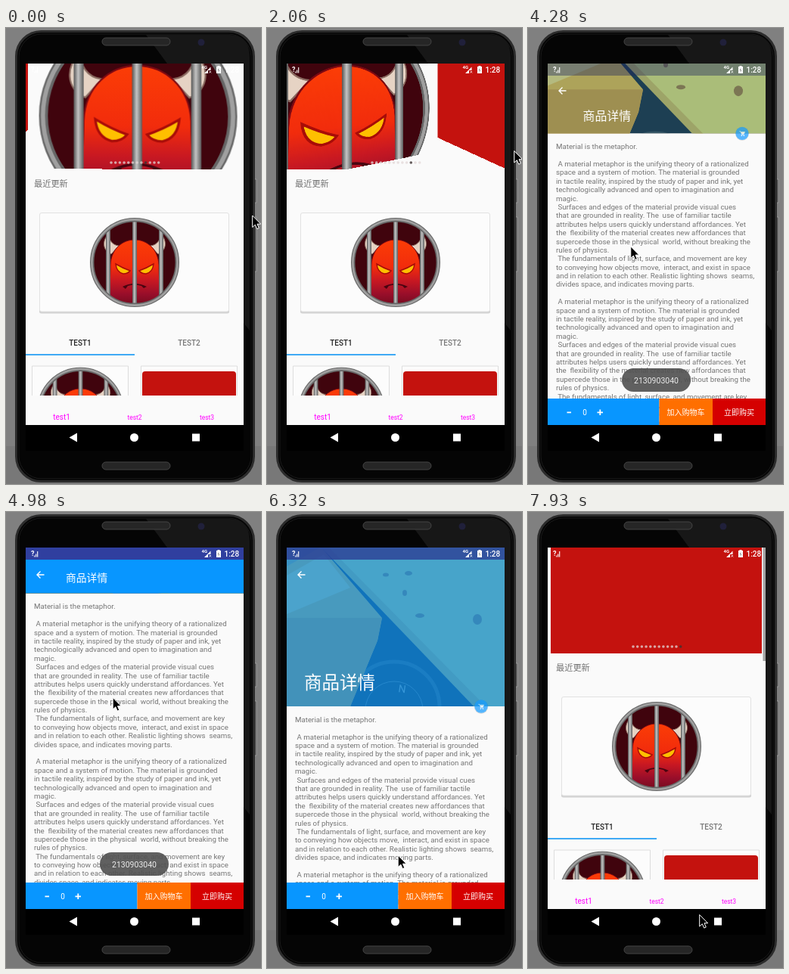
An HTML page for the animation above (7.99 s loop, 337 px wide and 603 px high).

```html
<!DOCTYPE html>
<html lang="zh">
<head>
<meta charset="utf-8">
<title>Shop demo</title>
<style>
html, body { margin: 0; width: 100%; height: 100%; overflow: hidden; background: #808080; }
body > svg { position: absolute; left: 0; top: 0; }
text { font-family: Roboto, "Noto Sans CJK SC", "Noto Sans CJK", sans-serif; white-space: pre; }
.mid { text-anchor: middle; }
#pager { position: absolute; left: 26px; top: 47px; width: 288px; height: 139.5px; overflow: hidden; background: #fafafa; }
.page { position: absolute; left: 0; top: 0; width: 288px; height: 139.5px; overflow: hidden; transform-origin: 50% 0; }
#red::before { content: ""; position: absolute; left: 4px; width: 279px; height: 100%; background: #c4120e; }
</style>
</head>
<body>
<svg width="337" height="603">
  <defs>
    <linearGradient id="steel">
      <stop offset="0" stop-color="#555"/><stop offset=".45" stop-color="#c4c4c4"/><stop offset="1" stop-color="#5a5a5a"/>
    </linearGradient>
    <linearGradient id="skin" x2="0" y2="1">
      <stop offset="0" stop-color="#fb3d06"/><stop offset=".4" stop-color="#f22c0c"/><stop offset=".6" stop-color="#c81822"/><stop offset=".8" stop-color="#980e2a"/><stop offset="1" stop-color="#6a0a1c"/>
    </linearGradient>
    <clipPath id="disc"><circle r="55"/></clipPath>
    <clipPath id="list"><rect x="26" y="440" width="288" height="46"/></clipPath>
    <g id="devil">
      <circle r="56" fill="#40040d"/>
      <g clip-path="url(#disc)">
        <path id="horn" d="M-34-38C-43-30-43-16-31-11L-21-22C-30-23-34-30-34-38Z" fill="#e6d3c4" stroke="#8a6a60"/>
        <use href="#horn" transform="scale(-1 1)"/>
        <path d="M-35 60C-34 40-32 20-32 3C-31-18-16-30 0-30S31-18 32 3C32 20 34 40 35 60Z" fill="url(#skin)" stroke="#7d0812"/>
        <path id="eye" d="M-25 2Q-15 8-6 11Q-9 15-15 15Q-24 13-25 2Z" fill="#ffbf00" stroke="#a80c08" stroke-width="1.5"/>
        <use href="#eye" transform="scale(-1 1)"/>
        <path d="M-16 32Q0 24 16 32L12 34L9 31Q0 28-9 31L-12 35Z" fill="#4a0410"/>
        <path id="bar" d="M-3-58h6v116h-6z" fill="url(#steel)"/>
        <use href="#bar" x="-35"/><use href="#bar" x="35"/>
      </g>
      <circle r="56.3" fill="none" stroke="#666" stroke-width="5.4"/>
      <circle r="56.6" fill="none" stroke="#a0a0a0" stroke-width="2.6"/>
    </g>
  </defs>
  <!-- phone -->
  <path d="M0 553H337V603H0Z" fill="#787878"/>
  <path d="M328 200h3v31h-3zM328 250h3v72h-3z" fill="#555" stroke="#aaa" stroke-width=".7"/>
  <rect x="13.5" y="4.5" width="314" height="595" rx="33" fill="#050505" stroke="#2c2c2c" stroke-width="3"/>
  <rect x="17" y="8" width="307" height="588" rx="30" fill="none" stroke="#1a1a1a"/>
  <path d="M185 9H295Q322 9 322 38V400L314 390V47H213Z" fill="#171717"/>
  <g fill="#262626" stroke="#444"><rect x="127" y="13" width="90" height="10" rx="5"/><rect x="127" y="574" width="90" height="10" rx="5"/></g>
  <circle cx="258" cy="19" r="4.5" fill="#20203a"/>
  <rect x="26" y="525" width="288" height="34"/>
  <!-- home -->
  <rect x="26" y="47" width="288" height="478" fill="#fafafa"/>
  <text x="37" y="210" font-size="11.2" fill="#757575">最近更新</text>
  <rect x="44" y="246.5" width="251" height="131" rx="2.5" fill="#d2d2d2"/>
  <rect x="44.5" y="244.5" width="250" height="130.5" rx="2.5" fill="#fcfcfc" stroke="#e2e2e2"/>
  <use href="#devil" transform="translate(170 310)"/>
  <g class="mid" font-size="10" font-weight="500">
    <text x="98" y="419.5" fill="#222">TEST1</text><text x="242" y="419.5" fill="#777">TEST2</text>
  </g>
  <rect x="26" y="431" width="144" height="2" fill="#3ea9f5"/>
  <g clip-path="url(#list)">
    <path d="M34.5 447H161.5V490H34.5ZM178.5 447H305.5V490H178.5Z" fill="#fcfcfc" stroke="#ddd"/>
    <use href="#devil" transform="translate(98.5 506) scale(.97)"/>
    <rect x="180" y="454" width="124" height="124" rx="4" fill="#c4120e"/>
  </g>
  <g class="mid" fill="#f0f"><text x="73.5" y="518" font-size="10">test1</text>
    <text x="170" y="518" font-size="8.5">test2</text><text x="265.5" y="518" font-size="8.5">test3</text></g>
</svg>

<div id="pager">
  <div class="page" id="red"></div>
  <div class="page" id="mon"><svg width="288" height="140"><use href="#devil" transform="translate(144 69.5) scale(2.22)"/></svg></div>
</div>

<svg width="337" height="603">
  <defs>
    <clipPath id="screen"><rect x="26" y="47" width="288" height="478"/></clipPath>
    <clipPath id="head"><rect id="headBox" x="26" y="47" width="288" height="210"/></clipPath>
    <clipPath id="navBox"><rect x="26" y="525" width="288" height="34"/></clipPath>
  </defs>
  <g id="dots"></g>
  <rect id="scrollbar" x="310.5" y="47" width="3.5" height="150" fill="#8c8c8c" opacity=".8"/>

  <g id="detail"><g clip-path="url(#screen)">
    <rect x="26" y="47" width="288" height="478" fill="#fafafa"/>
    <g id="body" font-size="9.72" fill="#757575"></g>
    <g clip-path="url(#head)">
      <g id="photo">
        <rect x="26" y="47" width="288" height="215" fill="#24241f"/>
        <g fill="none" stroke="#6b6754"><circle cx="168" cy="258" r="60" stroke-width="5" opacity=".5"/><circle cx="168" cy="262" r="38"/></g>
        <text x="174" y="239" font-size="14" fill="#a19a7e" transform="rotate(8 180 232)">N</text>
        <path d="M26 47H72L152 140L146 170L108 262H26Z" fill="#e0a628"/>
        <path d="M26 140L152 140L146 170L108 262H26Z" fill="#cc8c1c"/>
        <path d="M26 84L75 56L110 100L26 135Z" fill="#e8c458"/>
        <path d="M26 47H70L26 72Z" fill="#b08a3c"/>
        <path d="M72 47H314V262H284Z" fill="#dcc850"/>
        <path d="M72 47H82L294 262H278Z" fill="#cba83a"/>
        <g fill="#a06c20"><ellipse cx="157" cy="83" rx="4" ry="2.5"/><ellipse cx="187" cy="81" rx="5" ry="3"/><ellipse cx="182" cy="107" rx="3" ry="4"/><ellipse cx="202" cy="137" rx="6" ry="3"/><ellipse cx="278" cy="142" rx="6" ry="7"/></g>
      </g>
      <rect id="scrim" x="26" y="47" width="288" height="210" fill="#0896ff"/>
    </g>
    <rect x="26" y="47" width="288" height="16" fill="#000" opacity=".22"/>
    <rect id="topBar" x="26" y="47" width="288" height="16" fill="#303f9f"/>
    <path d="M50.5 83H41M45.5 78.5L41 83L45.5 87.5" fill="none" stroke="#fff" stroke-width="1.4"/>
    <text id="title" fill="#fff">商品详情</text>
    <g id="fab">
      <circle cy="1.5" r="20.5" fill="#000" opacity=".16"/><circle r="19.5" fill="#159bff"/>
      <path d="M-8-6h3l4 8h6l3-6h-11" fill="#fff" stroke="#fff" stroke-width="1.5"/>
      <path d="M-1 2l-1.5 2.5h9" fill="none" stroke="#fff" stroke-width="1.3"/>
      <circle cx="-1.5" cy="7" r="1.6" fill="#fff"/><circle cx="5.5" cy="7" r="1.6" fill="#fff"/>
    </g>
    <path d="M26 490H173.5V525H26Z" fill="#0896ff"/><path d="M173.5 490H244V525H173.5Z" fill="#ff6f00"/><path d="M244 490H314V525H244Z" fill="#d50000"/>
    <g class="mid" fill="#fff" font-size="10">
      <path d="M51.5 507.5h5.5v1.8h-5.5zM91.5 507.4h7.5v1.8h-7.5zM94.4 504.5h1.8v7.5h-1.8z"/>
      <text x="75" y="512">0</text><text x="208.5" y="511.5">加入购物车</text><text x="279" y="511.5">立即购买</text>
    </g>
  </g></g>

  <g fill="#fff">
    <text x="33" y="58" font-size="9" font-weight="700">?</text>
    <path d="M37 59.5h1.3v-2h-1.3zM39 59.5h1.3v-4h-1.3zM41 59.5h1.3v-7.5h-1.3z" opacity=".85"/>
    <text x="258.5" y="54" font-size="6" font-weight="700">4G</text>
    <path d="M262 60L270.5 51.5V56H267V60Z"/><path d="M268.5 57l2.5 2.5m0-2.5l-2.5 2.5" stroke="#fff" stroke-width=".8"/>
    <path d="M278 51h1.5v-1h3v1h1.5v9h-6z"/><path d="M281.5 52.5l-2 3.5h1.5l-.5 3l2-3.5h-1.5z" fill="#888"/>
    <text x="288.5" y="59" font-size="10" font-weight="500">1:28</text>
  </g>
  <g clip-path="url(#navBox)"><circle id="ripple" cx="89" cy="541" fill="#fff"/></g>
  <g fill="#fff"><path d="M83.5 541.5L94 535.5V547.5Z"/><circle cx="169.5" cy="541.5" r="5.5"/><rect x="246" y="536.5" width="10" height="10"/></g>
  <g id="toast"><rect x="124" y="450" width="91" height="31" rx="15.5" fill="#505050" opacity=".9"/>
    <text class="mid" x="169.5" y="469.5" font-size="10.5" fill="#eee">2130903040</text></g>
  <path id="cursor" d="M-.8-1v15.5l3.6-3.3l2.4 5.4l2.6-1.1l-2.3-5.3h4.7z" fill="#000" stroke="#fff"/>
</svg>

<script>
const LOOP = 7990, $ = id => document.getElementById(id);
const set = (id, attrs) => { for (const k in attrs) $(id).setAttribute(k, attrs[k]); };
const clamp = v => Math.max(0, Math.min(1, v));

// Eased value between key points [time, ...values].
function at(t, keys) {
  let i = keys.findIndex(k => k[0] > t);
  if (i < 0) i = keys.length;
  const a = keys[Math.max(0, i - 1)], b = keys[Math.min(i, keys.length - 1)];
  let u = b[0] > a[0] ? clamp((t - a[0]) / (b[0] - a[0])) : 0;
  u = u * u * (3 - 2 * u);
  return a.slice(1).map((v, n) => v + (b[n + 1] - v) * u);
}

const mouse = [[450, 326.5, 249], [1130, 25, 143], [1340, 25, 143], [1950, 327.5, 163.5], [2150, 327.5, 163.5],
  [2780, 120, 93.5], [3670, 120, 93.5], [3980, 138, 400], [4440, 136, 248], [4550, 136, 248], [4900, 142, 246.5],
  [5000, 142, 246.5], [5300, 155, 320], [5410, 155, 320], [5590, 157, 309], [5850, 165, 170], [6060, 170, 306],
  [6300, 174, 455], [6400, 174, 455], [6990, 89, 541], [7120, 89, 541], [7560, 227.5, 533.5]];
const collapse = [[4000, 0], [4400, 149.5], [5000, 149.5], [5300, 0], [5410, 0], [5590, 10], [5850, 149.5], [6060, 149.5], [6290, 0]];
const scrim = [[4200, 0], [4460, 1], [5130, 1], [5500, 0], [5740, 0], [6000, 1], [6200, 1], [6320, .7], [6700, 0]];
const fab = [[4200, 1], [4350, 0], [5220, 0], [5400, 1], [5700, 1], [5850, 0], [6250, 0], [6320, .45], [6430, 1]];
const toast = [[3080, 0], [3290, .85], [3400, 1], [5100, 1], [5400, 0]];

const para = `
 A material metaphor is the unifying theory of a rationalized
space and a system of motion. The material is grounded
in tactile reality, inspired by the study of paper and ink, yet
technologically advanced and open to imagination and
magic.
 Surfaces and edges of the material provide visual cues
that are grounded in reality. The  use of familiar tactile
attributes helps users quickly understand affordances. Yet
the  flexibility of the material creates new affordances that
supercede those in the physical  world, without breaking the
rules of physics.
 The fundamentals of light, surface, and movement are key
to conveying how objects move,  interact, and exist in space
and in relation to each other. Realistic lighting shows  seams,
divides space, and indicates moving parts.
`;
$("body").innerHTML = ("Material is the metaphor.\n" + para + para.slice(0, -1)).split("\n")
  .map((s, i) => `<text x="37" y="${277.9 + i * 11.39}">${s}</text>`).join("");
$("dots").innerHTML = Array.from({ length: 12 }, (_, i) => `<circle cx="${139 + i * 5.7}" cy="178" r="1.8"/>`).join("");

// Pages swing like a tablet: up to 30 degrees, kept edge to edge.
function placePage(id, d) {
  const deg = 30 * Math.abs(d), r = deg * Math.PI / 180, sign = d < 0 ? 1 : -1, P = 115;
  const gap = 144 - 144 * Math.cos(r) * P / (P + 144 * Math.sin(r));
  const style = $(id).style;
  style.display = Math.abs(d) < 1 ? "" : "none";
  style.transform = `translateX(${d * 288 + sign * gap}px) perspective(${P}px) rotateY(${sign * deg}deg)`;
}

function drawHome(t) {
  let pos = 11;
  if (t < 2000) pos = 8 - .017 * (1 - clamp(t / 240)) ** 2;
  else if (t < 5000) pos = 9 - (1 - clamp((t - 2003) / 800)) ** 5;
  placePage("mon", 2 * Math.round(pos / 2) - pos);
  placePage("red", 2 * Math.round((pos - 1) / 2) + 1 - pos);
  const active = t < 2000 ? 8 : t < 5000 ? 9 : 11;
  [...$("dots").children].forEach((dot, i) =>
    dot.setAttribute("fill", i === active ? "rgba(60,50,50,.8)" : "rgba(225,215,215,.75)"));
  set("scrollbar", { visibility: t > 7700 ? "visible" : "hidden" });
}

function drawDetail(t) {
  const open = clamp((t - 3080) / 410), shut = clamp((t - 7700) / 220);
  const shown = t >= 3080 && shut < 1;
  set("detail", {
    visibility: shown ? "visible" : "hidden",
    opacity: Math.min(1, .3 + open) * (1 - shut),
    transform: `translate(0 ${28 * (1 - open) + 34 * shut})`
  });
  const [c] = at(t, collapse), [s] = at(t, scrim), [f] = at(t, fab), k = c / 149.5;
  set("body", { transform: `translate(0 ${-c})` });
  set("photo", { transform: `translate(0 ${-c / 2})` });
  set("headBox", { height: 210 - c });
  set("scrim", { opacity: s });
  set("topBar", { opacity: s });
  set("title", { x: 49 + 30 * k, y: 234 - 142 * k, "font-size": 23.5 - 9.7 * k });
  set("fab", { transform: `translate(283 ${257 - c}) scale(${f})`, opacity: Math.min(1, f * 1.6) });
}

const start = performance.now();
function frame() {
  const t = (performance.now() - start) % LOOP, ring = clamp((t - 7050) / 510);
  drawHome(t);
  drawDetail(t);
  set("toast", { opacity: at(t, toast)[0] });
  set("ripple", { r: 38 * Math.sqrt(ring), opacity: ring ? .2 * (1 - ring) : 0 });
  set("cursor", { transform: `translate(${at(t, mouse)})` });
  requestAnimationFrame(frame);
}
frame();
</script>
</body>
</html>
```
